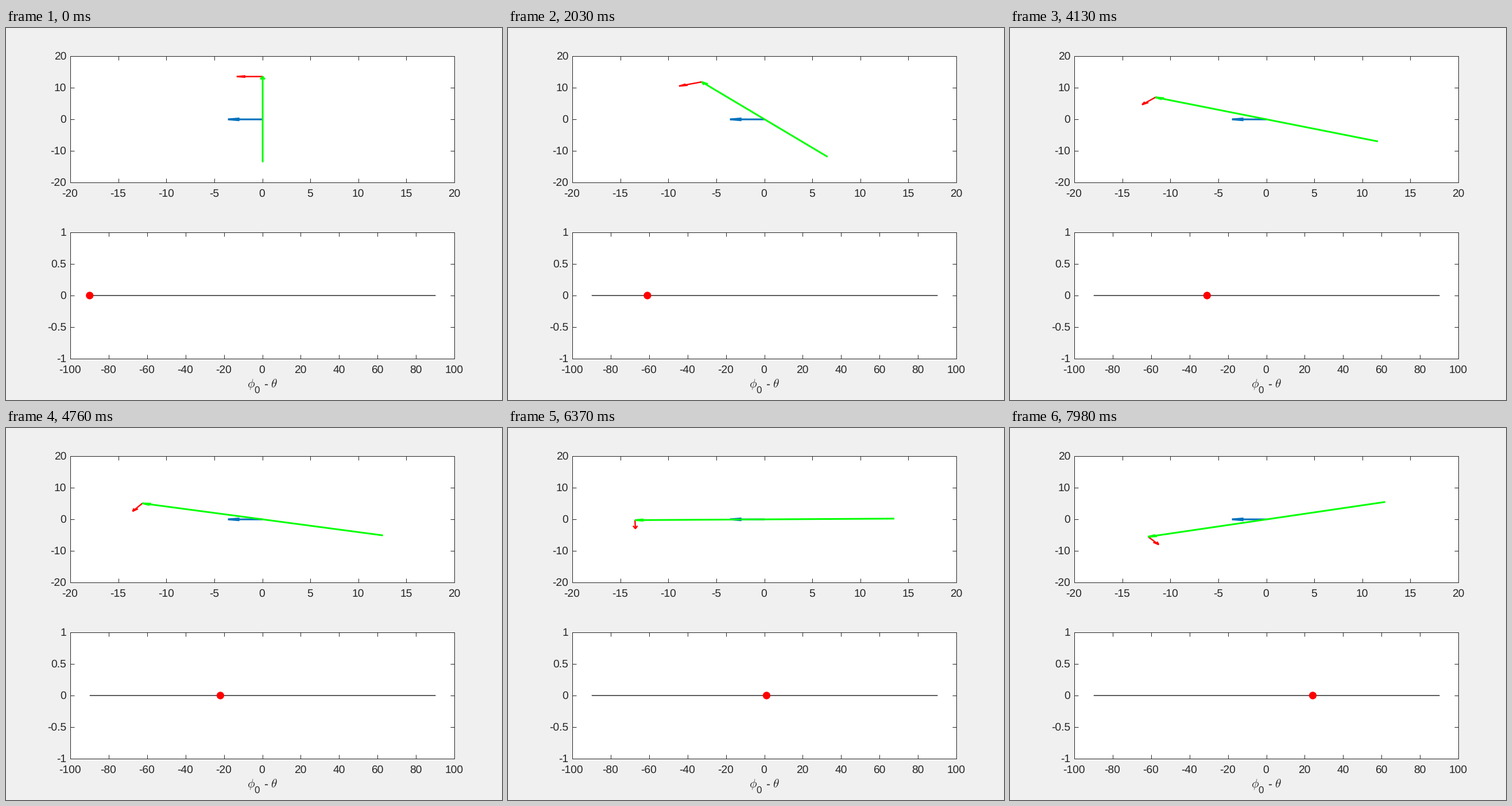
A matplotlib script that plays this animation: 864x648 px, repeating every 8 s.

```python
import numpy as np
import matplotlib
import matplotlib.pyplot as plt
from matplotlib.animation import FuncAnimation
from matplotlib.collections import LineCollection
from matplotlib.patches import Circle, Rectangle

matplotlib.rcParams["font.family"] = "Liberation Sans"
matplotlib.rcParams["mathtext.fontset"] = "cm"
matplotlib.rcParams["text.hinting"] = "none"

W, H, DPI = 864, 648, 100
PT = 72 / DPI
INK = (0.15, 0.15, 0.15)
LEFT, RIGHT = 112, 781
MID_X, MID_Y = 447.1, 159.15
TICK = 7
FONT = 19.3
STEP_MS, INTERVAL, LOOP_MS = 70, 20, 8000

fig = plt.figure(figsize=(W / DPI, H / DPI), dpi=DPI, facecolor="#f0f0f0")
ax = fig.add_axes([0, 0, 1, 1])
ax.set_xlim(0, W)
ax.set_ylim(H, 0)
ax.axis("off")


def label(x, y, text, size=FONT, ha="center"):
    # Agg draws text one pixel low and shifted right by its side bearing
    ax.text(x - 1, y - 1, text, fontsize=size * PT, color=INK, ha=ha, va="baseline")


def panel(top, bottom, x_names, y_names):
    """White box with inward ticks on all four sides and tick labels."""
    ax.add_patch(Rectangle((LEFT, top), RIGHT - LEFT + 1, bottom - top + 1,
                           fc="white", lw=0))
    l, r, t, b = LEFT + 0.5, RIGHT + 0.5, top + 0.5, bottom + 0.5
    segs = [[(l - 0.5, y), (r + 0.5, y)] for y in (t, b)]
    segs += [[(x, t - 0.5), (x, b + 0.5)] for x in (l, r)]
    for x, name in zip(np.linspace(l, r, len(x_names)), x_names):
        px = np.floor(x) + 0.5
        segs += [[(px, t), (px, t + TICK)], [(px, b), (px, b - TICK)]]
        label(x, bottom + 26, name)
    for y, name in zip(np.linspace(t, b, len(y_names)), y_names):
        py = np.floor(y) + 0.5
        segs += [[(l, py), (l + TICK, py)], [(r, py), (r - TICK, py)]]
        label(106, np.floor(y) + 7, name, ha="right")
    ax.add_collection(LineCollection(segs, colors=[INK], linewidths=PT,
                                     snap=False, zorder=2))


class Arrow:
    """Arrow in data units of the upper panel; the head is sheared with the axes."""

    def __init__(self, color, width, head, z):
        self.head = head
        style = dict(color=color, lw=width * PT, zorder=z, snap=False,
                     solid_capstyle="butt", solid_joinstyle="bevel")
        self.shaft, = ax.plot([], [], **style)
        self.barbs, = ax.plot([], [], **style)

    def place(self, start, vec):
        start, vec = np.array(start), np.array(vec)
        tip = start + vec
        along = vec / np.hypot(*vec) * self.head
        side = 0.25 * np.array([-along[1], along[0]])
        self.shaft.set_data(*to_px([start, tip]))
        self.barbs.set_data(*to_px([tip - along + side, tip, tip - along - side]))


def to_px(points):
    x, y = np.array(points).T
    return MID_X + 16.74 * x, MID_Y - 5.525 * y


def angle_px(deg):
    return MID_X + 3.348 * deg


panel(49, 269, [str(v) for v in range(-20, 21, 5)],
      [str(v) for v in range(20, -21, -10)])
panel(356, 576, [str(v) for v in range(-100, 101, 20)],
      ["1", "0.5", "0", "-0.5", "-1"])

label(428.5, 628, r"$\phi$", 21.2)
label(438.5, 638, "0", 17)
label(454, 628, "-", 21.2)
label(467.5, 628, r"$\theta$", 21.2)

ax.plot([angle_px(-90), angle_px(90)], [466, 466], color="black",
        lw=1.25 * PT, solid_capstyle="butt", snap=False, zorder=3)
dot = ax.add_patch(Circle((angle_px(-90), 466), 6.6, fc="red", lw=0, zorder=4))

blue = Arrow((0, 0.447, 0.741), 3.1, 1.19, 3)
red = Arrow((1, 0, 0), 2.4, 0.9, 4)
green = Arrow((0, 1, 0), 3, 0.9, 5)
blue.place((0, 0), (-3.6, 0))


def draw(i):
    turn = (i * INTERVAL + INTERVAL // 2) // STEP_MS  # one degree per step
    c, s = np.cos(np.radians(turn)), np.sin(np.radians(turn))
    end = 13.5 * np.array([-s, c])
    green.place(-end, 2 * end)
    red.place(end, (-2.7 * c, -2.7 * s))
    dot.center = (angle_px(turn - 90), 466)
    return dot, red.shaft, red.barbs, green.shaft, green.barbs


anim = FuncAnimation(fig, draw, frames=LOOP_MS // INTERVAL, interval=INTERVAL,
                     repeat=True, repeat_delay=0, cache_frame_data=False)
plt.show()
```
